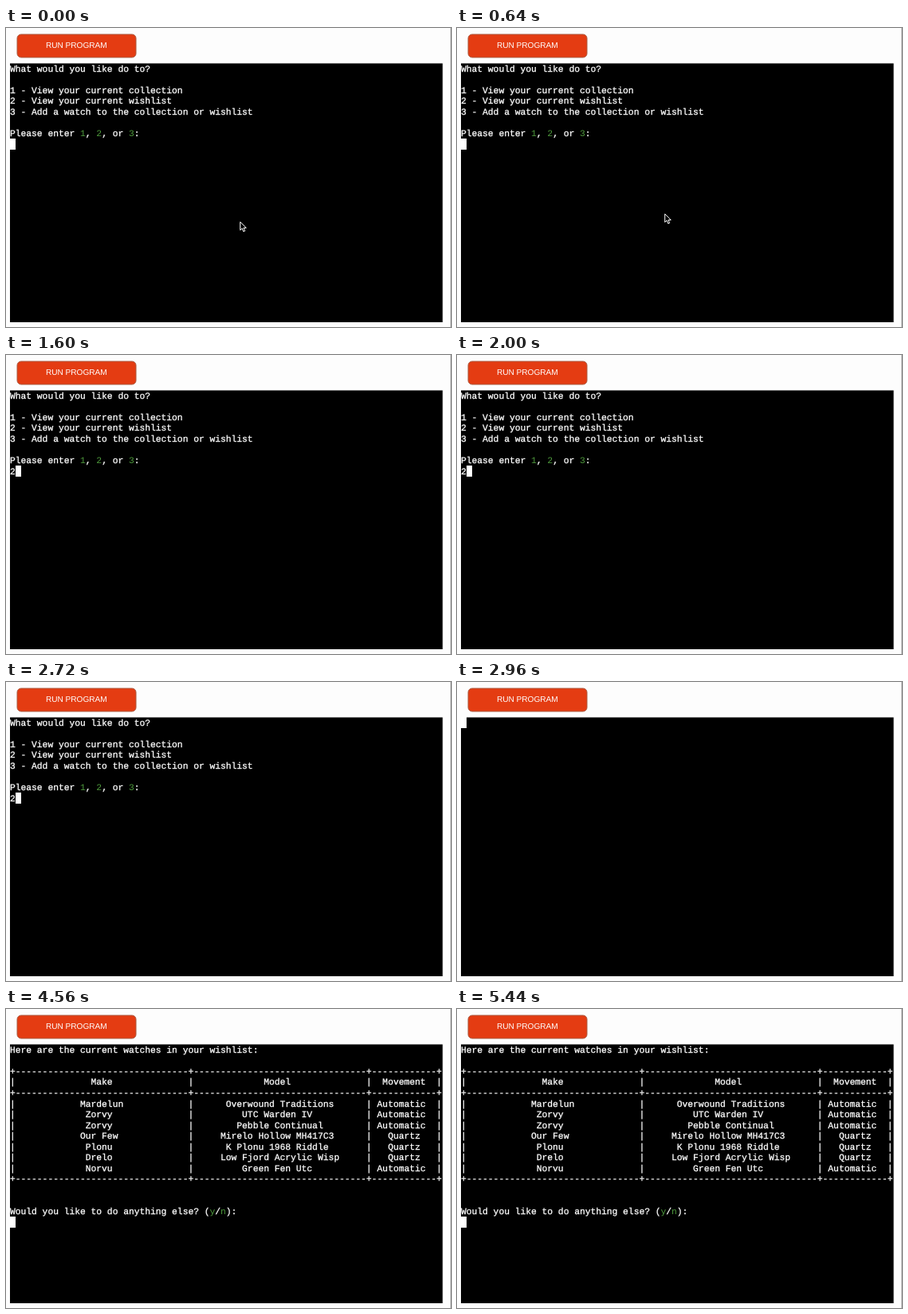
Recreate the animation shown at these times as an HTML page. Size 558x376 px, loop 5.52 s.

```html
<!DOCTYPE html>
<html lang="en">
<head>
<meta charset="utf-8">
<style>
  html, body { margin: 0; width: 100%; height: 100%; overflow: hidden; background: #fdfdfd; }
  #stage { position: relative; width: 558px; height: 376px; overflow: hidden; }
  #stage > * { position: absolute; left: 0; top: 0; }
  #run {
    font: 10.1px "Liberation Sans", Arial, sans-serif; fill: #fff;
    text-anchor: middle; text-rendering: geometricPrecision;
  }
  #text {
    left: 5px !important; top: 46.8px !important; margin: 0; color: #fff;
    font: 11.29px/13.55px "Liberation Mono", "Courier New", monospace;
    -webkit-text-stroke: .3px; text-rendering: geometricPrecision;
  }
  #text i { font-style: normal; color: #4e9a3c; -webkit-text-stroke: 0; }
  #caret { width: 7px; height: 14px; background: #fff; }
</style>
</head>
<body>
<div id="stage">
  <svg width="558" height="376">
    <rect x="14" y="8" width="149" height="29" rx="5" fill="#e43c12" stroke="#a9583f"/>
    <text id="run" x="88.3" y="25.4">RUN PROGRAM</text>
    <rect x="5" y="44.5" width="542.5" height="325.5"/>
    <rect x="557" width="1" height="376" fill="#b4b4b4"/>
  </svg>
  <pre id="text"></pre>
  <div id="caret"></div>
  <svg id="mouse" width="10" height="15">
    <path d="M.7 .8V11.2L3.1 9L4.8 13L6.6 12.2L4.9 8.4H8.2Z" stroke="#fff"/>
  </svg>
</div>
<script>
const LOOP = 5520, STEP = 80, CELL_W = 6.775, CELL_H = 13.58;
const $ = id => document.getElementById(id);
const move = (id, x, y) => $(id).style.transform = `translate(${x}px, ${y}px)`;

const menu = `What would you like do to?

1 - View your current collection
2 - View your current wishlist
3 - Add a watch to the collection or wishlist

Please enter <i>1</i>, <i>2</i>, or <i>3</i>:
`;

const widths = [32, 32, 12];
const center = (s, width) =>
  s.padStart(s.length + Math.floor((width - s.length) / 2)).padEnd(width);
const row = cells => '|' + cells.map((s, i) => center(s, widths[i])).join('|') + '|';
const rule = '+' + widths.map(w => '-'.repeat(w)).join('+') + '+';

const watches = [
  ['Mardelun', 'Overwound Traditions', 'Automatic'],
  ['Zorvy', 'UTC Warden IV', 'Automatic'],
  ['Zorvy', 'Pebble Continual', 'Automatic'],
  ['Our Few', 'Mirelo Hollow MH417C3', 'Quartz'],
  ['Plonu', 'K Plonu 1968 Riddle', 'Quartz'],
  ['Drelo', 'Low Fjord Acrylic Wisp', 'Quartz'],
  ['Norvu', 'Green Fen Utc', 'Automatic']
];

const wishlist = [
  'Here are the current watches in your wishlist:', '',
  rule, row(['Make', 'Model', 'Movement']), rule,
  ...watches.map(row), rule, '', '',
  'Would you like to do anything else? (<i>y</i>/<i>n</i>):'
].join('\n');

const scenes = [
  { at: 0, text: menu, col: 0, line: 7 },
  { at: 1440, text: menu + '2', col: 1, line: 7 },
  { at: 2800, text: '', col: 0, line: 0 },
  { at: 3760, text: wishlist, col: 0, line: 16 }
];

let shown;
function show(scene) {
  if (scene === shown) return;
  shown = scene;
  $('text').innerHTML = scene.text;
  move('caret', Math.round(5 + scene.col * CELL_W), Math.round(44 + scene.line * CELL_H));
}

function draw() {
  const t = Math.floor(performance.now() % LOOP / STEP) * STEP;
  show(scenes.findLast(s => s.at <= t));
  const p = Math.min(t / 160, 1);
  move('mouse', 293 - 33 * p, 243 - 10 * p);
  // The pointer hides once typing starts.
  $('mouse').style.visibility = t < scenes[1].at ? 'visible' : 'hidden';
  requestAnimationFrame(draw);
}
draw();
</script>
</body>
</html>
```
